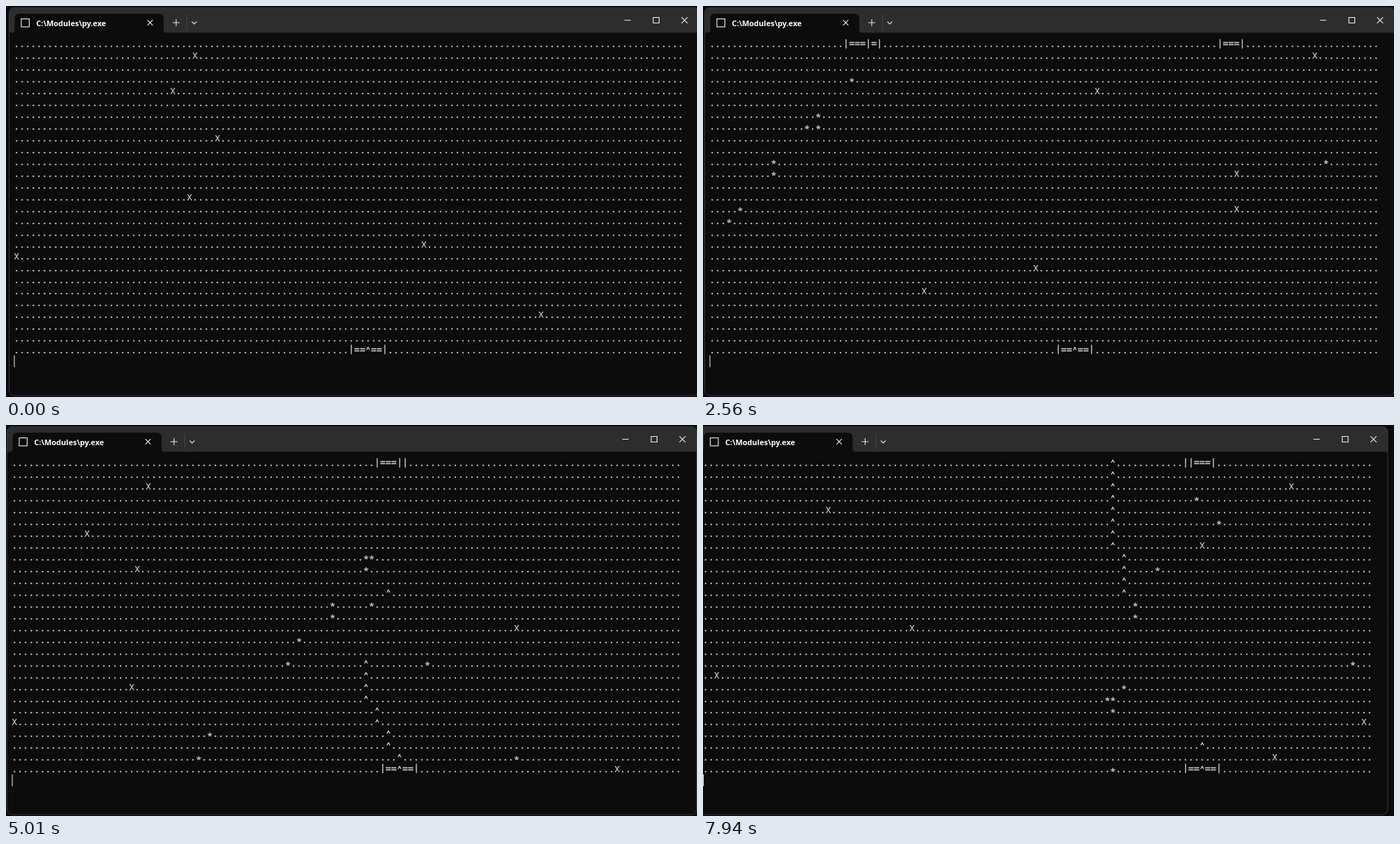
An HTML page with a canvas that plays this animation: 995x563 px, repeating every 8 s.

```html
<!DOCTYPE html>
<html lang="en">
<head>
<meta charset="utf-8">
<title>Terminal shooter</title>
<style>
  html, body { margin: 0; width: 100%; height: 100%; overflow: hidden; background: #080a10; }
  canvas { display: block; }
</style>
</head>
<body>
<canvas id="stage" width="995" height="563"></canvas>
<script>
const ctx = document.getElementById('stage').getContext('2d');
const LOOP = 8000, TICK_MS = 98.5, LAST_TICK = 82;
const COLS = 120, ROWS = 27, CELL = 8.034, LINE = 16.96, LEFT = 15.3, BASE = 59.3;

// Key points, linear in between: [ms, window shift] and [tick, player column]
const DRIFT = [[0, 0], [940, -1], [2020, -1], [3260, -3], [6000, -3], [7740, -11.5], [LOOP, -11.5]];
const SHIP = [[0, 60], [8, 62], [21, 62], [33, 66], [45, 60], [55, 70], [60, 70], [68, 74], [70, 74], [79, 86], [99, 86]];

// Size, vertical shift and extra weight of each character
const GLYPHS = {
  '.': [13.4, 0, 0.6], 'X': [13.4, 0, 0.2], '*': [13.4, 3.5, 0.4],
  '^': [9, -2.9, 0.6], '=': [15, 0, 0.3], '|': [13.4, -1.8, 0.4]
};

function between(keys, x) {
  const i = Math.max(1, keys.findIndex(k => k[0] > x));
  const [x0, a] = keys[i - 1], [x1, b] = keys[i];
  return a + (b - a) * (x - x0) / (x1 - x0);
}

function random(seed) {
  const s = Math.sin(seed * 127.1 + 311.7) * 43758.5453;
  return s - Math.floor(s);
}

// The player moves in steps of two columns
const shipAt = tick => 2 * Math.floor(between(SHIP, tick) / 2);
const firing = tick => tick === 37 || (tick >= 43 && tick <= 68) || tick === 80;

// Each mover is { ch, col, row, born, step }: its row changes by step every tick
const movers = [];

for (let t = 0; t <= LAST_TICK; t++) {
  if (firing(t)) movers.push({ ch: '^', col: shipAt(t) + 3, row: ROWS - 2, born: t, step: -1 });
}

// Chasers move two columns a tick towards the player and drop bombs at random
const chasers = [
  { born: 13, end: 99, col: 0 }, { born: 14, end: 99, col: 0 },
  { born: 14, end: 66, col: COLS - 5 }, { born: 65, end: 99, col: COLS - 5 }
];
chasers.forEach((chaser, i) => {
  let col = chaser.col;
  chaser.path = {};
  for (let t = chaser.born; t <= LAST_TICK && t < chaser.end; t++) {
    if (t > chaser.born) col += 2 * Math.sign(shipAt(t) - col);
    chaser.path[t] = col;
    if (random(t * 4 + i) < 0.15) movers.push({ ch: '*', col: col + 3, row: 2, born: t, step: 1 });
  }
});

// About one rock every four ticks, some already falling at the start
for (let t = -24; t <= LAST_TICK; t += 4) {
  const born = t + Math.floor(random(t + 500) * 4);
  movers.push({ ch: 'X', col: Math.floor(random(t + 900) * COLS), row: 1, born, step: 1 });
}

function buildGrid(tick) {
  const grid = Array.from({ length: ROWS }, () => Array(COLS).fill('.'));
  const put = (row, col, text) => [...text].forEach((ch, i) => {
    if (grid[row]?.[col + i]) grid[row][col + i] = ch;
  });
  for (const m of movers) {
    if (tick >= m.born) put(m.row + m.step * (tick - m.born), m.col, m.ch);
  }
  for (const { path } of chasers) {
    if (tick in path) put(0, path[tick], '|===|');
  }
  put(ROWS - 1, shipAt(tick), '|==^==|');
  return grid;
}

function lines(color, width, ...paths) {
  ctx.strokeStyle = color;
  ctx.lineWidth = width;
  ctx.beginPath();
  for (const [x, y, ...rest] of paths) {
    ctx.moveTo(x, y);
    for (let i = 0; i < rest.length; i += 2) ctx.lineTo(rest[i], rest[i + 1]);
  }
  ctx.stroke();
}

function cross(x, y, r) {
  lines('#f2f2f2', 1.1, [x - r, y - r, x + r, y + r], [x + r, y - r, x - r, y + r]);
}

function drawWindow() {
  ctx.beginPath();
  ctx.roundRect(4, 2, 994, 559.5, 8);
  ctx.fillStyle = '#0c0c0c';
  ctx.fill();
  ctx.save();
  ctx.clip();
  ctx.fillStyle = '#2d2d2d';
  ctx.fillRect(4, 2, 994, 36.5);
  ctx.restore();
  ctx.beginPath();
  ctx.roundRect(4.5, 2.5, 993, 558.5, 8);
  ctx.strokeStyle = '#37383b';
  ctx.lineWidth = 1;
  ctx.stroke();

  // Tab with flared feet
  ctx.fillStyle = '#0c0c0c';
  ctx.beginPath();
  ctx.moveTo(8, 39);
  ctx.quadraticCurveTo(12.5, 39, 12.5, 34);
  ctx.lineTo(12.5, 18);
  ctx.quadraticCurveTo(12.5, 11, 19.5, 11);
  ctx.lineTo(220, 11);
  ctx.quadraticCurveTo(227, 11, 227, 18);
  ctx.lineTo(227, 34);
  ctx.quadraticCurveTo(227, 39, 231.5, 39);
  ctx.fill();

  ctx.strokeStyle = '#e4e4e4';
  ctx.lineWidth = 1.2;
  ctx.strokeRect(22, 18.5, 11.5, 11.5);
  ctx.fillStyle = '#fff';
  ctx.textAlign = 'left';
  ctx.font = 'bold 11px "Open Sans", sans-serif';
  ctx.fillText('C:\\Modules\\py.exe', 43.5, 28.5);

  cross(207.5, 24, 3.8);
  lines('#e8e8e8', 1.1, [240, 24, 250, 24], [245, 19, 245, 29]);
  lines('#464646', 1, [260.5, 13, 260.5, 35]);
  lines('#e8e8e8', 1.1, [267.5, 22.5, 271, 26, 274.5, 22.5]);
  lines('#f2f2f2', 1.1, [890.5, 20.5, 899.5, 20.5], [932, 16.5, 940.5, 16.5, 940.5, 24.5, 932, 24.5, 932, 16]);
  cross(977, 20.5, 4.3);
}

function drawGrid(grid) {
  ctx.fillStyle = ctx.strokeStyle = '#cccccc';
  ctx.textAlign = 'center';
  for (const [ch, [size, shift, weight]] of Object.entries(GLYPHS)) {
    ctx.font = `${size}px "Noto Sans Mono", monospace`;
    ctx.lineWidth = weight;
    grid.forEach((row, r) => row.forEach((cell, c) => {
      if (cell !== ch) return;
      const x = LEFT + c * CELL, y = BASE + r * LINE + shift;
      ctx.fillText(ch, x, y);
      ctx.strokeText(ch, x, y);
    }));
  }
}

let shown = '';
function draw(ms) {
  const tick = Math.floor(ms / TICK_MS + 0.5);
  const drift = Math.round(between(DRIFT, ms) * 2) / 2;
  const key = tick + ':' + drift;
  if (key === shown) return;
  shown = key;
  ctx.setTransform(1, 0, 0, 1, 0, 0);
  ctx.fillStyle = '#080a10';
  ctx.fillRect(0, 0, 995, 563);
  ctx.translate(drift, 0);
  drawWindow();
  drawGrid(buildGrid(tick));
  ctx.fillStyle = '#f2f2f2';
  ctx.fillRect(11.5, 503, 1, 17);
}

const start = performance.now();
function run() {
  draw((performance.now() - start) % LOOP);
  requestAnimationFrame(run);
}
run();
</script>
</body>
</html>
```
